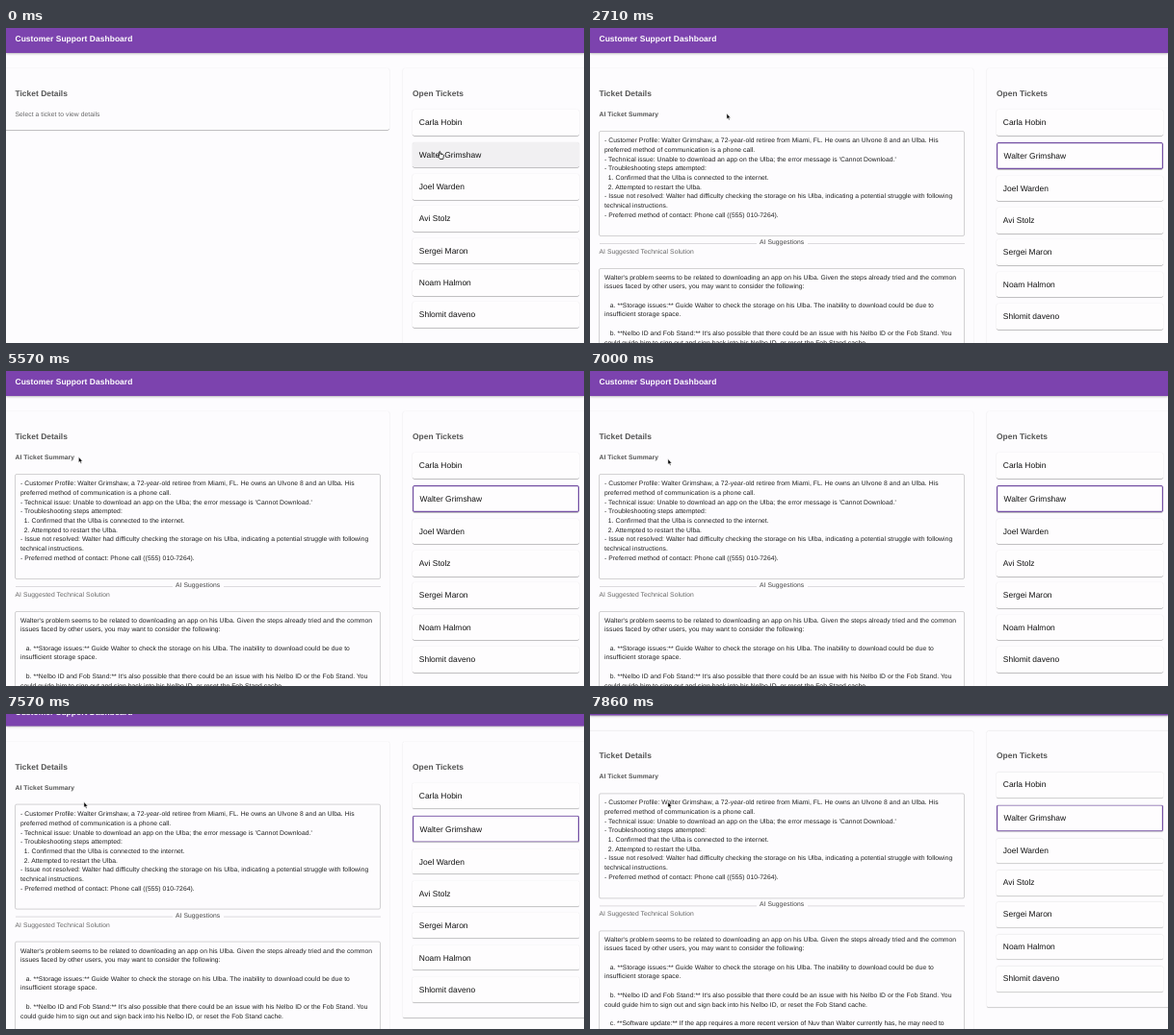
Animation of 600 by 328 pixels, one loop 8000 ms. Source, as an HTML page:

```html
<!DOCTYPE html>
<html lang="en">
<head>
<meta charset="utf-8">
<title>Customer Support Dashboard</title>
<style>
  html, body { margin: 0; width: 100%; height: 100%; overflow: hidden; background: #fdfcfe; }
  #stage {
    position: relative; width: 600px; height: 328px; overflow: hidden; background: #fdfcfe;
    font: 6.74px/9.69px "Liberation Sans", Arial, sans-serif; letter-spacing: .00938em;
    color: #1f1f1f; white-space: pre; text-rendering: geometricPrecision;
  }
  #stage div, #stage svg { position: absolute; box-sizing: border-box; }
  #page, #full { left: 0; top: 0; width: 600px; height: 600px; }
  #bar {
    left: 0; top: -2px; width: 600px; height: 27.5px; background: #7c43ae;
    box-shadow: 0 .8px 1.7px -.4px rgba(0,0,0,.2), 0 1.7px 2.1px rgba(0,0,0,.14), 0 .4px 4.2px rgba(0,0,0,.12);
  }
  .paper, .card {
    border-radius: 1.7px; background: #fdfcfe;
    box-shadow: 0 .8px .4px -.4px rgba(0,0,0,.2), 0 .4px .4px rgba(0,0,0,.14), 0 .4px 1.3px rgba(0,0,0,.18);
  }
  .head { font-size: 8.43px; font-weight: bold; letter-spacing: .002em; color: #555; }
  .sub { font-weight: bold; color: #555; }
  .soft { color: #666; }
  #details { left: -4px; top: 42px; width: 402px; height: 63.5px; }
  .open #details { height: 500px; }
  #hint, .open #full { visibility: visible; }
  #full, .open #hint { visibility: hidden; }
  .box {
    left: 9px; width: 379.5px; padding: 5.2px 0 0 5px;
    border: 1px solid rgba(0,0,0,.17); border-radius: 2px;
  }
  .rule { top: 223.5px; height: 1px; width: 163px; background: #dcdade; }
  #list { left: 422px; top: 85.3px; width: 173px; }
  #list .card {
    position: relative; height: 26.7px; margin-bottom: 6.63px; overflow: hidden;
    background: #fefdfe; font-size: 8.43px; letter-spacing: .002em; color: #111;
  }
  .card span { position: absolute; left: 6.8px; top: .2px; line-height: 26.7px; }
  #list .hot { background: #f1f0f2; }
  .open #list .pick { height: 28.4px; }
  .open .pick span { left: 7.6px; top: .9px; }
  .pick::after { content: ""; position: absolute; inset: 0; border-radius: 1.7px; }
  .open .pick::after { box-shadow: inset 0 0 0 1.2px #7450a4; }
  #ripple { left: -118px; top: -133px; width: 294px; height: 294px; border-radius: 50%; background: #000; }
  #cursor { left: -6px; top: -6px; width: 12px; height: 12px; }
</style>
</head>
<body>
<div id="stage">
  <div id="page">
    <div class="paper" id="details"></div>
    <div class="paper" style="left:412px;top:42px;width:200px;height:288px"></div>
    <div id="bar"></div>
    <div class="head" style="left:9.5px;top:7.3px;color:#fff;letter-spacing:.0075em">Customer Support Dashboard</div>
    <div class="head" style="left:9.5px;top:63.9px">Ticket Details</div>
    <div class="head" style="left:422px;top:63.9px">Open Tickets</div>
    <div class="soft" id="hint" style="left:9.5px;top:86px">Select a ticket to view details</div>
    <div id="full">
      <div class="sub" style="left:9.5px;top:86.4px">AI Ticket Summary</div>
      <div class="box" style="top:107px;height:110px">- Customer Profile: Walter Grimshaw, a 72-year-old retiree from Miami, FL. He owns an Ulvone 8 and an Ulba. His
preferred method of communication is a phone call.
- Technical issue: Unable to download an app on the Ulba; the error message is 'Cannot Download.'
- Troubleshooting steps attempted:
  1. Confirmed that the Ulba is connected to the internet.
  2. Attempted to restart the Ulba.
- Issue not resolved: Walter had difficulty checking the storage on his Ulba, indicating a potential struggle with following
technical instructions.
- Preferred method of contact: Phone call ((555) 010-7264).</div>
      <div class="rule" style="left:9.5px"></div>
      <div style="left:176px;top:219.2px;color:#444">AI Suggestions</div>
      <div class="rule" style="left:226px"></div>
      <div class="soft" style="left:9.5px;top:228.6px">AI Suggested Technical Solution</div>
      <div class="box" style="top:249.5px;height:240px">Walter's problem seems to be related to downloading an app on his Ulba. Given the steps already tried and the common
issues faced by other users, you may want to consider the following:

   a. **Storage issues:** Guide Walter to check the storage on his Ulba. The inability to download could be due to
insufficient storage space.

   b. **Nelbo ID and Fob Stand:** It's also possible that there could be an issue with his Nelbo ID or the Fob Stand. You
could guide him to sign out and sign back into his Nelbo ID, or reset the Fob Stand cache.

   c. **Software update:** If the app requires a more recent version of Nuv than Walter currently has, he may need to</div>
    </div>
    <div id="list"></div>
  </div>
  <svg id="cursor" viewBox="-6 -6 12 12">
    <path id="hand" d="M-1.8 .8V-3.6q.6-.9 1.2 0V-1.4l2.9.7q.7.3.6 1.2L2.2 4H-1L-3.2 .9q.2-.9 1.4-.1Z" fill="#fff" stroke="#111" stroke-width=".8"/>
    <path id="arrow" d="M-1.6-3.4V2.3L-.3 1.2.6 3.3 1.6 2.9.7.9H2.4Z" fill="#000" stroke="#fff" stroke-width=".5"/>
    <path id="beam" d="M-1.5-3.4Q0-3.4 0-2.5V2.5Q0 3.4-1.5 3.4M1.5-3.4Q0-3.4 0-2.5M0 2.5Q0 3.4 1.5 3.4" fill="none" stroke="#222" stroke-width=".8"/>
  </svg>
</div>
<script>
  const LOOP = 8000, STEPS = 56;
  const names = ["Carla Hobin", "Walter Grimshaw", "Joel Warden", "Avi Stolz",
    "Sergei Maron", "Noam Halmon", "Shlomit daveno"];
  // Cursor stops: step, x, y
  const path = [[0, 451.5, 132.5], [8, 451.5, 132.8], [19, 143.5, 92.5], [20, 143.5, 92.5],
    [28, 10.5, 90.5], [31, 10.5, 90.5], [39, 77, 93], [41, 77, 93], [42, 79, 94],
    [43, 79, 94], [46, 82.5, 95], [56, 82.5, 95]];
  const ripples = { 4: [.12, .08], 5: [.785, .1], 6: [1, .05] }; // scale, opacity
  const scroll = { 52: 6, 53: 13.4, 54: 19.5, 55: 24.6 };

  const $ = id => document.getElementById(id);
  const stage = $("stage"), page = $("page"), cursor = $("cursor");

  $("list").innerHTML = names.map((name, i) =>
    `<div class="card${i === 1 ? " pick" : ""}">${i === 1 ? '<div id="ripple"></div>' : ""}<span>${name}</span></div>`
  ).join("");
  const pick = document.querySelector(".pick"), ripple = $("ripple");

  function cursorAt(step) {
    const i = path.findIndex(p => p[0] > step);
    const [s0, x0, y0] = path[i - 1], [s1, x1, y1] = path[i];
    const p = (step - s0) / (s1 - s0), e = p * p * (3 - 2 * p);
    return [x0 + (x1 - x0) * e, y0 + (y1 - y0) * e];
  }

  function draw(step) {
    const [x, y] = cursorAt(step);
    const shape = x > 422 ? "hand" : x < 72 ? "beam" : "arrow";
    cursor.style.transform = `translate(${x}px, ${y}px)`;
    for (const id of ["hand", "arrow", "beam"]) $(id).style.display = id === shape ? "" : "none";

    stage.classList.toggle("open", step >= 5);
    pick.classList.toggle("hot", shape === "hand");
    const [scale, opacity] = ripples[step] || [0, 0];
    ripple.style.transform = `scale(${scale})`;
    ripple.style.opacity = opacity;
    page.style.transform = `translateY(${-(scroll[step] || 0)}px)`;
  }

  let last = -1;
  function tick(now) {
    const step = Math.min(STEPS - 1, Math.floor((now % LOOP + 5) * STEPS / LOOP));
    if (step !== last) draw(last = step);
    requestAnimationFrame(tick);
  }
  draw(0);
  requestAnimationFrame(tick);
</script>
</body>
</html>
```
